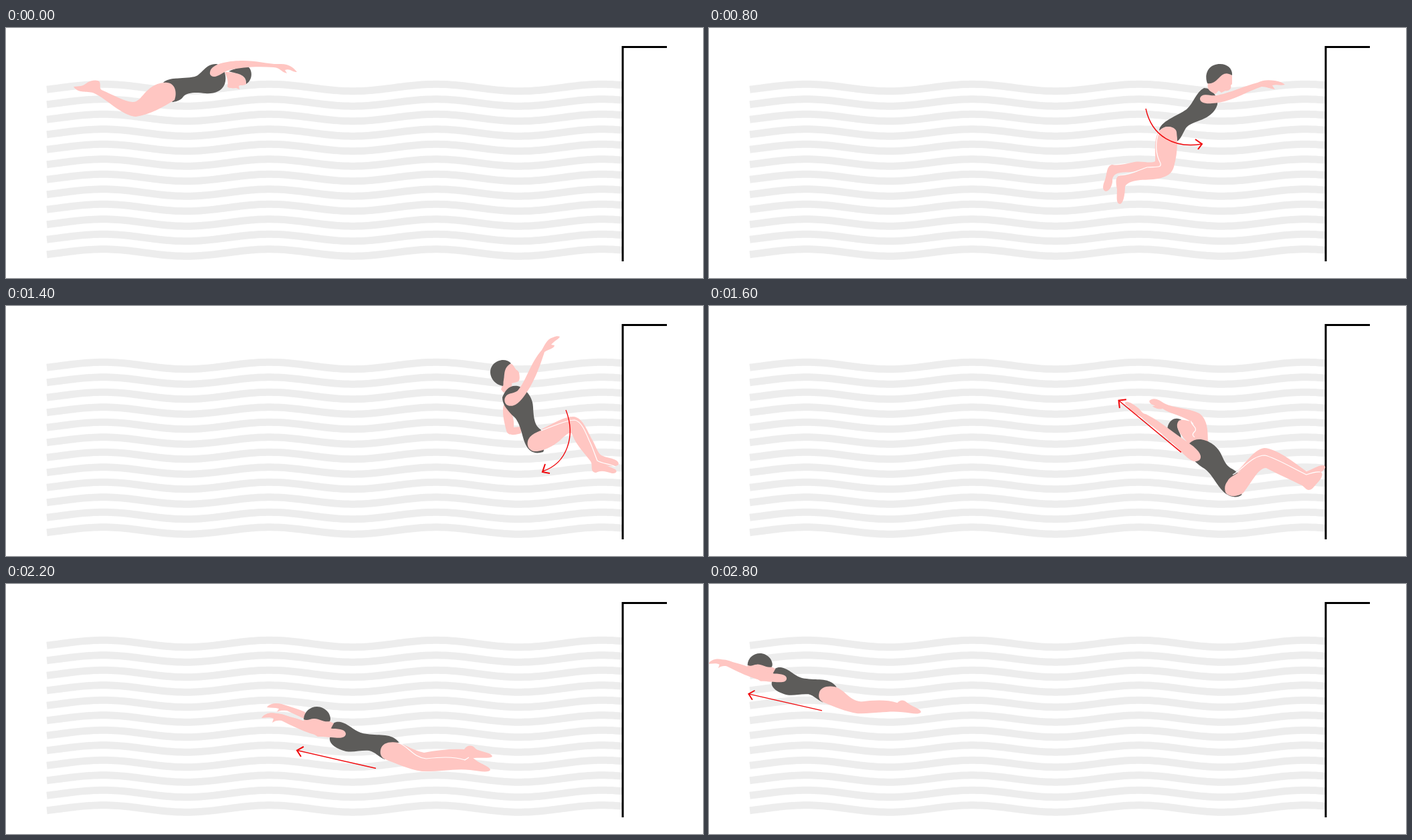
Write an HTML page that moves like this. It is 1042 by 375 pixels and loops after 3 s.

```html
<!DOCTYPE html>
<html lang="en">
<head>
<meta charset="utf-8">
<title>Swim turn</title>
<style>
  html, body { margin: 0; width: 100%; height: 100%; overflow: hidden; background: #fff; }
  svg { display: block; width: 1042px; height: 375px; }
  path { fill: #ffc6c2; }
  .suit { fill: #5d5c5a; }
  .crease { fill: none; stroke: #fff; stroke-width: 1.2; }
  .wave { fill: none; stroke: #ededed; stroke-width: 11; }
  .wall { fill: none; stroke: #000; stroke-width: 3; }
  .arrow { fill: none; stroke: #f0080c; stroke-width: 1.4; }
  .tip { fill: none; stroke: #f0080c; stroke-width: 2; }
</style>
</head>
<body>
<svg viewBox="0 0 1042 375">
<defs>
  <g id="stroke">
    <path class="suit" d="M235 82C244 73 262 77 282 73C293 70 298 53 315 54C326 58 331 72 327 84C322 96 310 99 298 98C288 97 272 95 265 103C262 108 254 111 248 111C256 103 256 84 235 82Z"/>
    <path d="M101 88C110 87 114 88 120 83C126 78 138 77 140 81C142 86 139 90 143 93C160 100 176 110 189 111C204 112 207 85 236 82C254 80 256 98 252 108C236 118 215 130 194 133C174 132 150 106 132 98C124 94 108 99 101 88Z"/>
    <path d="M327 66C345 66 360 70 359 84C356 87 350 85 348 87L349 92L344 90C338 91 332 90 331 88C333 78 329 72 327 66Z"/>
    <path class="suit" d="M333 65C345 59 355 58 362 58C369 64 369 78 359 84C360 70 348 69 333 65Z"/>
    <path d="M305 66C307 52 338 49 354 49C376 49 394 55 411 54C424 54 430 60 435 66C428 66 424 60 417 63L420 68C411 66 411 60 400 59C374 57 352 59 334 63C324 66 318 73 311 73C307 73 304 70 305 66Z"/>
  </g>

  <g id="stretch">
    <path class="suit" d="M458 93C470 78 490 85 510 87C528 87 536 75 553 76C560 80 561 96 560 105C548 118 535 120 520 115C505 109 495 110 489 115C484 119 478 118 473 118C485 112 486 90 458 93Z"/>
    <path d="M315 94C320 85 333 90 343 82C348 79 354 80 355 88C360 94 385 87 405 98C425 106 440 95 462 93L470 105L420 115C390 104 360 100 352 95C342 94 328 96 315 94Z"/>
    <path d="M315 106C322 97 334 101 344 94C350 91 352 97 355 99C376 102 393 96 415 105C434 104 442 93 460 91C480 90 487 105 476 118C458 120 440 126 420 126C392 125 377 111 350 109C338 107 320 113 315 106Z"/>
    <path class="crease" d="M338 97C348 90 350 96 355 99C376 102 393 96 415 105C430 105 440 96 448 94"/>
    <path d="M557 86C566 72 590 75 600 84L590 95L562 92Z"/>
    <path class="suit" d="M564 77C565 58 590 53 600 66C605 73 604 80 600 85C592 85 594 77 580 77C572 77 568 81 564 77Z"/>
    <path d="M537 91C539 83 552 86 560 89C580 95 610 84 633 87C640 84 650 85 654 88C660 91 663 94 666 97C658 98 654 94 647 94L650 100C643 98 638 94 630 93C610 98 580 104 560 103C545 102 537 98 537 91Z"/>
    <path class="arrow" d="M462 42H583"/>
    <path class="tip" d="M575 34L583 42L575 50"/>
  </g>

  <g id="riseBody">
    <path class="suit" d="M673 154C674 140 700 132 714 122C725 112 728 96 740 90C752 90 762 104 760 115C752 140 722 138 713 150C708 158 706 166 700 170C699 158 697 149 687 148C680 148 677 151 673 154Z"/>
    <path d="M746 82C755 70 778 62 782 72L782 84L780 86C782 92 776 95 772 94L766 97L762 94L757 99C748 95 744 92 746 82Z"/>
    <path class="suit" d="M745 83C740 70 746 54 764 54C776 54 783 62 782 71C770 64 766 72 758 79C753 83 749 84 745 83Z"/>
  </g>
  <g id="riseArm">
    <path d="M734 106C735 99 744 100 750 101C768 103 796 88 820 82C830 77 838 78 846 79C853 80 858 82 861 85C854 87 850 84 842 86L846 92C838 91 834 88 826 88C806 94 780 112 752 113C742 114 734 112 734 106Z"/>
  </g>
  <g id="riseLegs">
    <path d="M672 155C664 170 668 185 667 200C660 204 648 199 636 201C624 203 613 207 603 205C594 206 595 220 592 228C589 235 587 243 593 245C600 245 604 233 603 227C606 215 618 217 630 216C650 214 665 213 674 207L684 180Z"/>
    <path d="M673 156C678 145 697 146 699 156C701 172 700 190 695 208C690 228 664 227 645 228C636 229 625 231 622 238C622 247 620 264 614 264C608 263 610 252 610 242C608 232 607 222 615 221C628 222 645 213 655 209C668 208 676 210 675 203C671 190 666 172 673 156Z"/>
    <path class="crease" d="M612 221C628 221 645 212 655 209C668 208 677 210 675 203C668 190 666 172 673 156"/>
  </g>
  <g id="riseArrow">
    <path class="arrow" d="M653 121C662 163 696 181 737 174"/>
    <path class="tip" d="M727 167L737 174L731 182"/>
  </g>

  <g id="push">
    <path d="M744 148C741 160 745 175 748 187C750 195 760 194 770 191L770 181L759 182C760 172 758 165 752 150Z"/>
    <path d="M754 86C760 88 760 95 765 97L767 100C768 106 769 113 764 114L756 116C758 122 752 126 744 130L740 125C744 118 742 110 745 104C744 95 748 88 754 86Z"/>
    <path class="suit" d="M743 120C726 117 719 99 728 88C736 79 749 79 755 86C743 93 746 103 744 111C743 115 744 118 743 120Z"/>
    <path class="suit" d="M742 137C746 127 752 118 765 120C778 124 788 138 788 152C789 174 792 180 800 186C806 192 806 215 803 219C780 226 775 205 771 190C766 172 762 168 756 163C748 154 742 147 742 137Z"/>
    <path d="M747 136C750 130 758 132 765 127C778 112 784 85 801 66C806 58 808 50 818 47C822 45 826 45 828 46C826 50 820 52 815 58L820 59C819 64 813 64 805 69C800 85 790 115 774 136C766 147 758 152 750 149C745 147 744 140 747 136Z"/>
    <path d="M800 185C815 178 835 165 849 166C862 168 868 185 876 200C882 210 884 220 890 224C898 228 908 228 913 232C918 236 916 240 910 240C896 240 888 238 882 234L855 190L840 185Z"/>
    <path d="M781 200C786 190 800 187 812 182C830 175 842 171 850 171C860 173 866 188 872 202C877 212 880 222 884 232C892 237 902 241 911 245C915 249 911 251 906 251C896 248 890 246 882 250C872 249 878 239 874 233C866 222 852 208 847 194C845 186 838 193 832 198C822 208 808 216 794 218C782 219 777 209 781 200Z"/>
    <path class="crease" d="M800 187C830 175 842 171 850 171C860 173 866 188 872 202C877 212 880 222 884 232C892 237 902 236 911 241"/>
    <path class="arrow" d="M837 156C852 195 839 236 802 248"/>
    <path class="tip" d="M806 237L802 249L813 251"/>
  </g>

  <g id="backBody">
    <path d="M609 250C611 242 620 241 630 242C646 241 668 228 683 228C700 230 708 246 716 258L690 272C692 260 690 250 682 245C666 243 645 251 632 250C628 254 624 255 617 255L620 252C614 254 610 253 609 250Z"/>
    <path class="suit" d="M653 271C648 258 656 249 666 250C662 256 663 260 667 264C674 270 684 272 674 283L665 286C658 282 655 278 653 271Z"/>
    <path d="M662 253C666 247 673 248 678 244C682 248 690 248 692 256C690 262 697 262 700 268L694 277C686 273 690 274 680 271C668 266 661 262 662 253Z"/>
    <path class="crease" d="M678 244C682 250 691 247 691 254C689 260 691 262 695 262"/>
    <path class="suit" d="M693 274C697 260 710 257 721 257C746 258 748 275 768 274C780 274 786 278 788 281L800 300C796 310 784 312 774 310C758 306 746 296 732 295C720 295 705 292 699 286Z"/>
    <path d="M579 271C581 266 592 267 601 268C606 269 609 272 615 270C640 268 665 273 692 274C710 275 720 280 719 287C715 299 700 294 685 290C662 284 630 280 608 277C602 279 592 278 587 276L589 273C584 274 580 273 579 271Z"/>
  </g>
  <g id="backLegs">
    <path d="M784 275C800 263 812 238 830 235C848 236 870 253 893 270C903 267 911 260 919 261C924 263 920 268 915 271L900 285L880 275L830 250Z"/>
    <path d="M775 285C778 278 785 277 795 269C806 257 818 245 831 246C848 250 870 264 893 275C902 272 908 270 914 271C920 273 915 282 909 288C904 293 902 298 896 298C890 296 890 292 884 290C868 282 850 274 833 265C822 264 812 285 799 302C790 309 776 309 772 301C770 294 772 289 775 285Z"/>
    <path class="crease" d="M783 275C797 268 812 246 831 246C848 250 870 264 893 275C902 272 908 270 914 271"/>
  </g>
  <g id="backArrow">
    <path class="arrow" d="M680 297.500L560 279"/>
    <path class="tip" d="M569 272L560 279L567 288"/>
  </g>

  <g id="glideFar">
    <path d="M390 185C394 179 404 178 412 180C425 184 438 188 447 192L452 205L420 190C414 190 411 189 405 192L408 187C402 185 396 186 390 185Z"/>
    <path d="M585 239C600 241 608 250 625 253C645 249 665 247 685 248C690 241 697 241 702 247C708 252 726 252 727 259C722 262 710 260 700 261L640 268L600 258Z"/>
  </g>
  <g id="glide">
    <path class="suit" d="M485 216C488 207 494 206 500 207C516 211 522 224 540 225C560 228 576 223 588 238L566 263C558 260 552 252 543 250C530 249 520 253 508 251C492 247 480 238 485 228Z"/>
    <path d="M446 203C460 198 478 203 486 207L490 209L485 218L488 229L466 229L440 212Z"/>
    <path class="suit" d="M445 203C446 184 470 177 482 193C485 198 486 203 484 206C474 208 468 201 460 202C455 202 450 206 445 203Z"/>
    <path d="M382 201C386 194 396 192 404 194C412 194 420 198 428 200C444 204 454 210 468 212L488 217C500 217 508 219 508 225C507 232 498 231 486 230C468 230 445 222 412 205C406 204 402 205 398 208L400 202C394 199 388 201 382 201Z"/>
    <path d="M560 249C562 238 574 236 586 238C602 243 608 260 628 262C646 260 668 258 686 264C691 258 697 259 702 264C710 270 724 274 724 279C720 284 706 280 694 279C672 276 648 282 622 281C602 278 585 270 567 263C560 260 559 254 560 249Z"/>
  </g>
  <path id="glideCrease" class="crease" d="M586 238C602 243 608 260 628 262C646 260 668 258 686 264L692 260"/>
  <g id="glideArrow">
    <path class="arrow" d="M553 276.500L435 249.500"/>
    <path class="tip" d="M445 244L435 249.500L441 259"/>
  </g>
</defs>
<g id="pool"></g>
<path class="wall" d="M988 28.500H922V350"/>
<g id="poses"></g>
</svg>
<script>
const STEP = 200;
const $ = id => document.getElementById(id);

function add(parent, tag, attrs = {}) {
  const el = document.createElementNS('http://www.w3.org/2000/svg', tag);
  for (const key in attrs) el.setAttribute(key, attrs[key]);
  return parent.appendChild(el);
}

// Twelve parallel wave bands
for (let row = 0; row < 12; row++) {
  const points = [];
  for (let x = 61; x <= 921; x += 5) {
    const y = 89.5 + 22.5 * row - 5.2 * Math.cos((x - 145) / 249 * 2 * Math.PI);
    points.push(x + ' ' + y.toFixed(2));
  }
  add($('pool'), 'path', { class: 'wave', d: 'M' + points.join('L') });
}

// Each step: parts with an optional transform, drawn in order
const rise = (body, legs, arm, arrow) =>
  [['riseBody', body], ['riseLegs', legs], ['riseArm', arm], ['riseArrow', arrow]];
const back = (body, legs, arrow) =>
  [['backBody', body], ['backLegs', legs], ['backArrow', arrow]];
const glide = (move, arrow = move) => [['glide', move], ['glideArrow', arrow]];
const glideBoth = move => [['glideFar', move], ...glide(move), ['glideCrease', move]];
const shrink = 'scale(.93) translate(-724 -183)';

const steps = [
  [['stroke']],
  [['stretch', 'translate(-132.4 0) scale(1.017 1)']],
  [['stretch']],
  [['stretch', 'translate(125 0)']],
  rise(),
  rise('translate(68 3) rotate(-12 685 160)', 'translate(68 3) rotate(-18 685 160)',
       'translate(53 -8)', 'translate(65 8)'),
  rise('translate(95 6) rotate(-30 685 160)', 'translate(95 0) rotate(-85 685 160)',
       'translate(61 -17)', 'translate(95 10) rotate(-25 685 160)'),
  [['push']],
  back('translate(4 -24) rotate(31 783 290)', 'translate(0 -22)',
       'translate(15 -24) rotate(31 783 290)'),
  back(),
  glideBoth('translate(96 27) rotate(3 555 230)'),
  glideBoth(),
  glide('translate(-140 -27)'),
  glide('translate(-267 -56)'),
  glide('translate(317 103) ' + shrink, 'translate(328 103) ' + shrink)
];

const poses = steps.map(parts => {
  const group = add($('poses'), 'g');
  for (const [id, move] of parts) {
    add(group, 'use', { href: '#' + id, transform: move || '' });
  }
  return group;
});

function draw() {
  const now = Math.floor(performance.now() / STEP) % poses.length;
  poses.forEach((pose, i) => { pose.style.display = i === now ? '' : 'none'; });
  requestAnimationFrame(draw);
}
draw();
</script>
</body>
</html>
```
